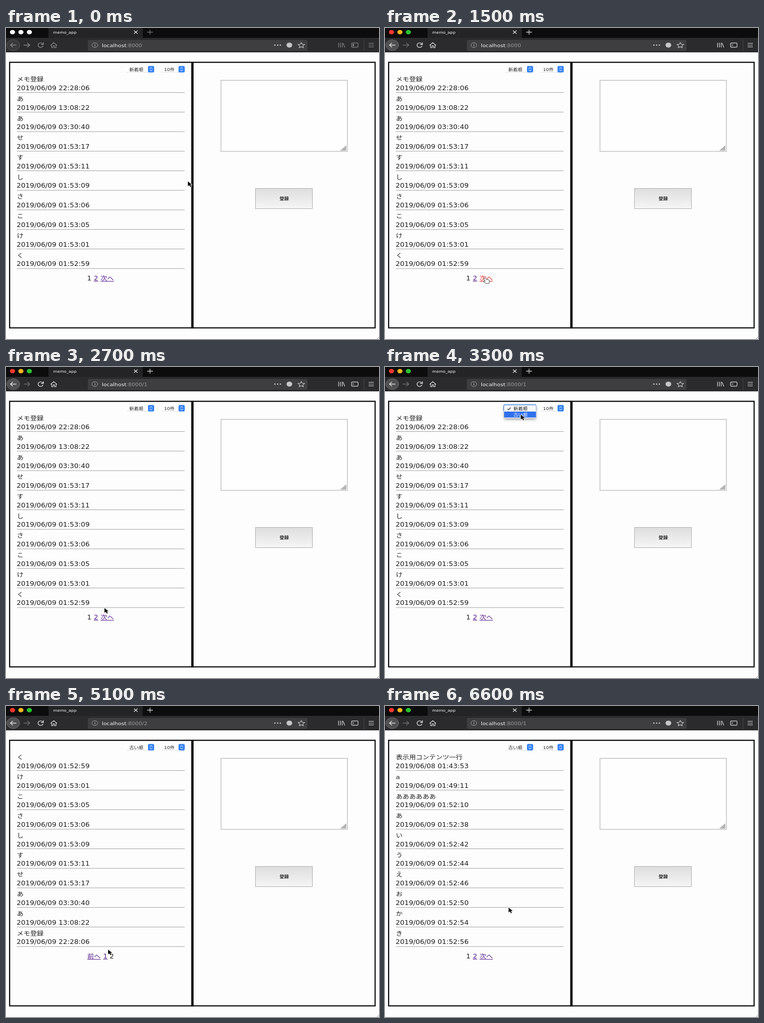
Animation of 720 by 600 pixels, one loop 6.9 s. Source, as an HTML page with a canvas:

```html
<!DOCTYPE html>
<html lang="ja">
<head>
<meta charset="utf-8">
<title>memo_app</title>
<style>
html, body { margin: 0; width: 100%; height: 100%; overflow: hidden; background: #fdfdfd; }
canvas { display: block; }
</style>
</head>
<body>
<canvas id="stage" width="720" height="600"></canvas>
<script>
const ctx = document.getElementById("stage").getContext("2d");
const STEP = 300, LOOP = 6900;
const ASPECT = 1.17; // the whole screen is shown slightly squashed
const ROW = 37.73;
const FONT = '"DejaVu Sans", "Noto Sans CJK JP", "Noto Sans CJK", sans-serif';
const INK = "#1e1e1e", LINK = "#551a8b", ACTIVE = "#e8251f";

// Newest first.
const memos = [
  "メモ登録|09 22:28:06", "あ|09 13:08:22", "あ|09 03:30:40", "せ|09 01:53:17",
  "す|09 01:53:11", "し|09 01:53:09", "さ|09 01:53:06", "こ|09 01:53:05",
  "け|09 01:53:01", "く|09 01:52:59", "き|09 01:52:56", "か|09 01:52:54",
  "お|09 01:52:50", "え|09 01:52:46", "う|09 01:52:44", "い|09 01:52:42",
  "あ|09 01:52:38", "ああああああ|09 01:52:10", "a|09 01:49:11", "表示用コンテンツ一行|08 01:43:53"
].map(s => s.split("|"));
const oldestFirst = [...memos].reverse();

const views = [
  { from: 0, path: "", page: 0 },
  { from: 6, path: "/2", page: 1 },
  { from: 9, path: "/1", page: 0 },
  { from: 12, path: "", page: 0, oldest: true },
  { from: 17, path: "/2", page: 1, oldest: true },
  { from: 22, path: "/1", page: 0, oldest: true }
];

// Pointer position per step; a third value marks the hand pointer.
const pointer = [
  [351, 296], [347, 318], [270, 420], [215, 473], [194, 482, 1], [194, 482, 1],
  [190, 481, 1], [178, 481, 1], [174, 480, 1], [190, 465], [248, 170], [262, 92],
  [262, 94], [225, 330], [199, 462], [195, 481, 1], [195, 481, 1], [197, 470],
  [190, 460], [188, 458], [175, 480, 1], [175, 480, 1], [238.5, 389]
];
const pressed = new Set([5, 16, 21]);
const MENU_STEP = 11;

function rect(x, y, w, h, fill) {
  ctx.fillStyle = fill;
  ctx.fillRect(x, y, w, h);
}

function frame(x, y, w, h, color, width = 1) {
  ctx.strokeStyle = color;
  ctx.lineWidth = width;
  ctx.strokeRect(x, y, w, h);
}

function round(x, y, w, h, r, fill) {
  ctx.beginPath();
  ctx.roundRect(x, y, w, h, r);
  ctx.fillStyle = fill;
  ctx.fill();
}

function oval(x, y, rx, ry, fill, stroke) {
  ctx.beginPath();
  ctx.ellipse(x, y, rx, ry, 0, 0, Math.PI * 2);
  if (fill) { ctx.fillStyle = fill; ctx.fill(); }
  if (stroke) { ctx.strokeStyle = stroke; ctx.lineWidth = 1; ctx.stroke(); }
}

function stroke(d, color, width = 1.4) {
  ctx.strokeStyle = color;
  ctx.lineWidth = width;
  ctx.stroke(new Path2D(d));
}

// Draws text in the screen's aspect and returns its width on screen.
function text(str, x, y, size, color = INK, weight = "") {
  ctx.save();
  ctx.translate(x, y);
  ctx.scale(ASPECT, 1);
  ctx.font = `${weight} ${size}px ${FONT}`;
  ctx.fillStyle = color;
  ctx.fillText(str, 0, 0);
  const width = ctx.measureText(str).width * ASPECT;
  ctx.restore();
  return width;
}

function link(str, x, size, color) {
  const w = text(str, x, 487.3, size, color);
  rect(x, 488.2, w, 1, color);
}

function drawBrowser(path, focused) {
  const icon = focused ? "#d6d6d6" : "#868688", faint = focused ? "#6a6a6c" : "#868688";
  rect(0, 0, 720, 47, "#0c0c0d");
  rect(82, 0, 182, 19, "#242426");
  rect(0, 19, 720, 28, "#2b2b2d");
  const lights = focused ? ["#f5372f", "#f6b51d", "#2bc32f"] : ["#f7f7f7", "#f7f7f7", "#f7f7f7"];
  lights.forEach((c, i) => oval(12.5 + 16.3 * i, 8, 5, 4.2, c));
  text("memo_app", 91, 11.3, 6.95, "#fff");
  stroke("M247 5l7 6M254 5l-7 6", "#e4e4e4", 1.2);
  stroke("M272.5 8h11M278 3.2v9.6", focused ? "#c8c8c8" : "#6d6d6f", 1.3);

  oval(14, 33, 12.5, 10.5, focused ? "#505052" : "#39393b", focused ? "#666668" : "#555557");
  stroke("M20 33H8.5M13.5 28.8l-5 4.2l5 4.2", icon);
  stroke("M34 33h12M41 28.8l5 4.2l-5 4.2", faint);
  stroke("M71 30.5a5 4.4 0 1 0 .6 4M72.3 27.8v3.9h-4.6", icon);
  stroke("M86 33.5l6.2-5.3l6.2 5.3M88 32.5v5.3h3v-3.5h2.6v3.5h3v-5.3", icon, 1.2);

  round(158, 23, 424, 21, 3, "#3e3e40");
  oval(171.5, 33, 5.5, 4.7, null, "#a0a0a2");
  rect(171, 32, 1.2, 3.8, "#a0a0a2");
  rect(171, 30, 1.2, 1.2, "#a0a0a2");
  const w = text("localhost", 185, 36.7, 9, "#f4f4f4");
  text(":8000" + path, 185 + w, 36.7, 9, "#9a9a9c");
  for (const x of [519, 524.3, 529.6]) oval(x, 33, 1.4, 1.2, "#c6c6c6");
  oval(547, 33, 5.5, 4.8, "#c6c6c6");
  stroke("M570 28l1.9 3.3l4.4.5l-3.2 2.6l.8 3.6l-3.9-1.8l-3.9 1.8l.8-3.6l-3.2-2.6l4.4-.5z", "#c6c6c6", 1.1);
  stroke("M642 28.5v9M645.5 28.5v9M649 28.5v9M650.5 29l3.5 8.5", icon, 1.2);
  ctx.beginPath();
  ctx.roundRect(667, 28.8, 12.5, 8.4, 1.5);
  ctx.strokeStyle = icon;
  ctx.stroke();
  rect(669, 30.8, 2.8, 4.4, faint);
  rect(690.5, 22, 1, 23, "#454547");
  stroke("M700 29.5h10M700 33h10M700 36.5h10", icon, 1.2);
}

function drawSelect(label, x, width, textX) {
  rect(x + 2, 85, width - 4, 1, "#d9d9d9");
  round(x, 73, width, 12.3, 3, "#fff");
  text(label, textX, 82.6, 7.7);
  const bx = x + width - 12;
  round(bx, 73.3, 12, 12.4, 2.5, "#3684f4");
  stroke(`M${bx + 3.5} 78.4l2.5-2l2.5 2M${bx + 3.5} 80.8l2.5 2l2.5-2`, "#fff", 1);
}

function drawMenu() {
  round(228, 71.5, 64.5, 14, 4, "#8bb9f5");
  ctx.save();
  ctx.shadowColor = "rgba(0,0,0,.4)";
  ctx.shadowBlur = 5;
  ctx.shadowOffsetY = 2;
  round(230, 74, 61.5, 25, 2.5, "#f7f7f7");
  ctx.restore();
  rect(230, 86, 61.5, 11.5, "#2f70ed");
  stroke("M236.5 80.7l2 2l4-4.4", INK, 1.1);
  text("新着順", 248, 83.4, 7.7);
  text("古い順", 248, 94.8, 7.7, "#fff");
}

function drawList({ page, oldest }) {
  const list = oldest ? oldestFirst : memos;
  list.slice(page * 10, page * 10 + 10).forEach(([title, date], i) => {
    const y = i * ROW;
    text(title, 21, 103.1 + y, 11);
    text("2019/06/" + date, 20.5, 119.8 + y, 11.4);
    rect(21, 124 + y, 324, 1, "#a4a4a4");
  });
}

function drawPager(page, down) {
  const color = down ? ACTIVE : LINK;
  if (page === 0) {
    text("1", 156.5, 487.3, 11.4);
    link("2", 169.5, 11.4, LINK);
    link("次へ", 182.5, 11, color);
  } else {
    link("前へ", 157, 11, color);
    link("1", 187.5, 11.4, LINK);
    text("2", 200, 487.3, 11.4);
  }
}

function drawForm() {
  rect(415, 101, 244, 137, "#fefefe");
  frame(415, 101, 244, 137, "#a6a6a6");
  ctx.fillStyle = "#b9b9b9";
  ctx.fill(new Path2D("M657 226.5v10h-12z"));
  stroke("M647 236l9.5-8.5M651.5 236l5-4.5", "#999", .7);
  const shade = ctx.createLinearGradient(0, 310, 0, 349);
  shade.addColorStop(0, "#dedede");
  shade.addColorStop(1, "#f6f6f6");
  rect(482, 310, 109, 39, shade);
  frame(481.5, 309.5, 110, 39, "#b0b0b0");
  text("登録", 528, 331.7, 7.7, INK, "bold");
}

function drawPointer([x, y, hand]) {
  const d = hand
    ? "M-2.5.5Q-.8-1 .3.8L2 3.2Q5 2 7.2 5Q8.5 8.5 6.5 11H1.5L-4 7.5Q-4.5 5.5-2.3 6.2L-.5 7L-3 2Q-3.4 1-2.5.5Z"
    : "M0 0V9.2L2.5 7.3L4.6 10.8L6.5 9.9L4.6 6.6L8 6.2Z";
  const shape = new Path2D(d);
  ctx.save();
  ctx.translate(x, y);
  ctx.lineJoin = "round";
  ctx.strokeStyle = hand ? "#444" : "#fff";
  ctx.lineWidth = hand ? 1 : 1.4;
  ctx.fillStyle = hand ? "#fff" : "#111";
  if (hand) { ctx.fill(shape); ctx.stroke(shape); }
  else { ctx.stroke(shape); ctx.fill(shape); }
  ctx.restore();
}

function draw(step) {
  const view = views.findLast(v => v.from <= step);
  rect(0, 0, 720, 600, "#fdfdfd");
  drawBrowser(view.path, step > 0);
  frame(7, 66.2, 705.5, 512.3, "#0a0a0a", 2.2);
  rect(357.5, 65.2, 4.6, 514.2, "#0a0a0a");
  drawSelect(view.oldest ? "古い順" : "新着順", 230, 56, 238);
  drawSelect("10件", 298, 47, 305);
  drawList(view);
  drawPager(view.page, pressed.has(step));
  drawForm();
  if (step === MENU_STEP) drawMenu();
  stroke("M716 600l4-3.5", "#999", 1);
  drawPointer(pointer[step]);
}

function tick(now) {
  draw(Math.floor((now % LOOP) / STEP));
  requestAnimationFrame(tick);
}
draw(0);
requestAnimationFrame(tick);
</script>
</body>
</html>
```
